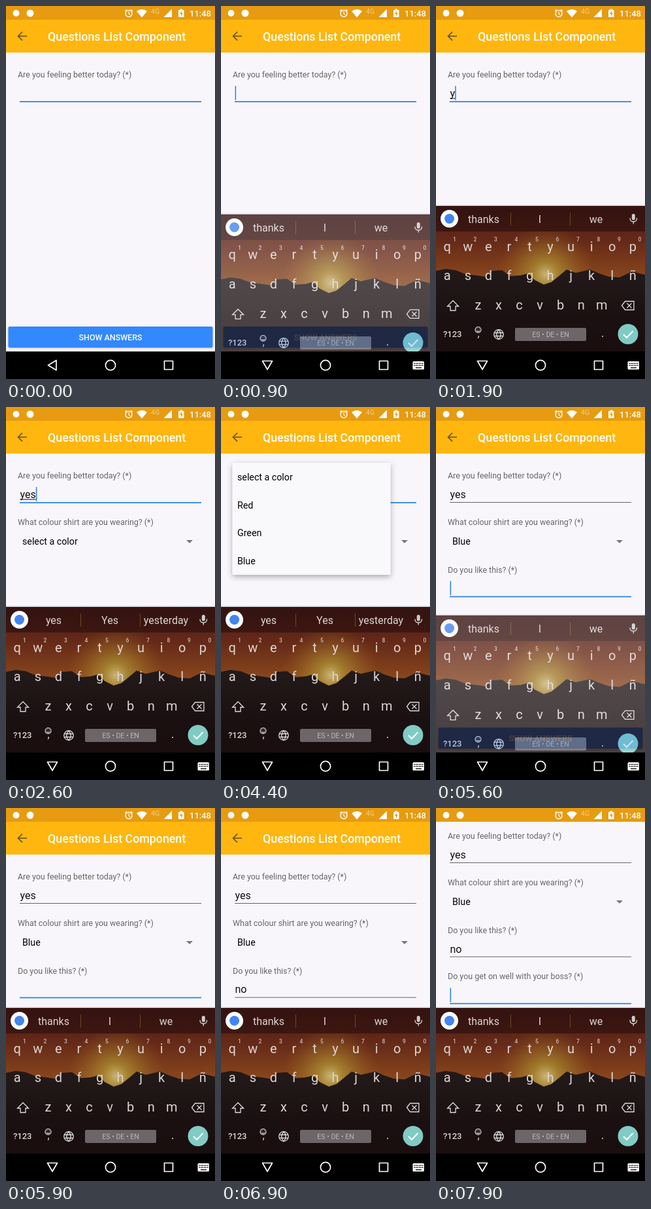
Write an HTML page that moves like this. It is 320x569 px and loops after 8000 ms.

```html
<!DOCTYPE html>
<html lang="en">
<head>
<meta charset="utf-8">
<title>Questions list</title>
<style>
  html, body { margin: 0; height: 100%; overflow: hidden; background: #f8f6fa; }
  svg { display: block; width: 100vw; height: 100vh; font-family: Roboto, sans-serif; }
  .mid { text-anchor: middle; }
  .bold { font-weight: 500; }
  .line { fill: none; stroke: #ddd; stroke-width: 1.3; }
</style>
</head>
<body>
<svg id="stage" viewBox="0 0 320 569">
  <defs>
    <linearGradient id="sky" x2="0" y2="1">
      <stop offset="0" stop-color="#4b1c17"/>
      <stop offset=".2" stop-color="#652918"/>
      <stop offset=".42" stop-color="#8a481d"/>
    </linearGradient>
    <radialGradient id="glow" gradientUnits="userSpaceOnUse" cx="168" cy="409" r="75">
      <stop offset="0" stop-color="#d5c98a" stop-opacity=".85"/>
      <stop offset=".25" stop-color="#b39a35" stop-opacity=".7"/>
      <stop offset="1" stop-color="#a0621c" stop-opacity="0"/>
    </radialGradient>
    <linearGradient id="rock" x2="0" y2="1">
      <stop offset="0" stop-color="#231a1a"/>
      <stop offset=".45" stop-color="#1b1011"/>
      <stop offset="1" stop-color="#180b0d"/>
    </linearGradient>
    <filter id="shadow" x="-10%" y="-10%" width="120%" height="125%">
      <feDropShadow dx="0" dy="3" stdDeviation="4" flood-opacity=".32"/>
    </filter>
    <filter id="soft" x="-5%" y="-20%" width="110%" height="150%">
      <feDropShadow dx="0" dy="1" stdDeviation="1" flood-opacity=".3"/>
    </filter>
    <clipPath id="aboveNav"><rect width="320" height="527"/></clipPath>
  </defs>
  <rect width="320" height="569" fill="#f8f6fa"/>
  <g id="page"></g>
  <g id="button"></g>
  <g id="status"></g>
  <g id="menu"></g>
  <g clip-path="url(#aboveNav)"><g id="keyboard"></g></g>
  <g id="nav"></g>
</svg>
<script>
const $ = id => document.getElementById(id);
const text = (x, y, s, size, fill, extra = '') =>
  `<text x="${x}" y="${y}" font-size="${size}" fill="${fill}" ${extra}>${s}</text>`;
const path = (d, extra = 'class="line"') => `<path d="${d}" ${extra}/>`;
const rect = (x, y, w, h, fill, extra = '') =>
  `<rect x="${x}" y="${y}" width="${w}" height="${h}" fill="${fill}" ${extra}/>`;
const circle = (x, y, r, extra) => `<circle cx="${x}" cy="${y}" r="${r}" ${extra}/>`;
const MID = 'class="mid"', BOLD = 'class="bold"', MIDBOLD = 'class="mid bold"';
const BLUE = '#3086e6';

// Form
const label = (y, s) => text(18, y, s, 12.44, '#666');
const field = (n, y) => `<g id="field${n}">
  ${text(21.5, y - 6, '', 16, '#111', `id="value${n}"`)}
  ${rect(21.5, y - 4.5, 0, 1, '#111', `id="compose${n}"`)}
  ${rect(21, y, 278, 1, '#666', `id="under${n}"`)}
  ${rect(21.5, y - 23, 1.6, 21.5, BLUE, `id="caret${n}"`)}</g>`;

$('page').innerHTML =
  rect(0, 21, 320, 50, '#ffb60f') +
  path('M32 46H19M25 39.5L18.5 46L25 52.5', 'fill="none" stroke="#65501f" stroke-width="1.7"') +
  text(64, 53.3, 'Questions List Component', 17.78, '#fff', BOLD) +
  label(109, 'Are you feeling better today? (*)') + field(1, 145) +
  `<g id="q2">${label(179.5, 'What colour shirt are you wearing? (*)')}
    ${text(25, 210, '', 14.22, '#000', 'id="colour"')}
    ${path('M276 203h10l-5 4.8z', 'fill="#757575"')}</g>
  <g id="q3">${label(252.5, 'Do you like this? (*)')}${field(3, 288.5)}</g>
  <g id="q4">${label(323.3, 'Do you get on well with your boss? (*)')}${field(4, 359.5)}</g>`;

$('button').innerHTML =
  rect(3.5, 489, 313, 32, '#3388ff', 'rx="2" filter="url(#soft)"') +
  text(160, 510, 'SHOW ANSWERS', 12.44, '#fff', MIDBOLD);

$('status').innerHTML =
  rect(0, 0, 320, 21, '#e69b10') +
  circle(15.5, 11, 5, 'fill="#fff"') + circle(37, 11, 5.5, 'fill="#fff"') +
  circle(188, 11.5, 5, 'fill="none" stroke="#fff" stroke-width="1.4"') +
  path('M188 8.5v3.5l2.3 1.4M182 7.7l3-2.5M194 7.7l-3-2.5', 'fill="none" stroke="#fff" stroke-width="1.2"') +
  path('M200 8Q208 2 216 8L208 17.5z', 'fill="#fff"') +
  text(222, 11.5, '4G', 10.5, '#f3cc85') +
  path('M254 4.5V17H241.5z', 'fill="#fff"') +
  path('M264 6h2.5V4.5h3.5V6h2.5v11H264z', 'fill="#fff"') +
  path('M269 7.5l-3 4.5h2v3.5l3-4.8h-2z', 'fill="#e69b10"') +
  text(281, 16, '11:48', 13, '#fff', BOLD);

$('menu').innerHTML =
  rect(17.5, 85, 242, 171, '#f9f8fb', 'rx="1.5" filter="url(#shadow)"') +
  ['select a color', 'Red', 'Green', 'Blue']
    .map((s, i) => text(25, 112 + 42.7 * i, s, 14.22, '#000')).join('');

// Keyboard
const INK = '#dcd6d4';
const keyRow = (keys, x, y) => [...keys]
  .map((c, i) => text(x + 31.55 * i, y, c, 20, INK, MID)).join('');

$('keyboard').innerHTML =
  rect(0, 303.5, 320, 1.5, '#000', 'opacity=".14"') +
  rect(0, 305, 320, 264, 'url(#sky)') +
  rect(80, 344, 180, 90, 'url(#glow)') +
  path(`M0 404L15 401 30 403 45 409 62 411 75 413 86 404 101 403 114 412 129 411 141 408
    151 418 165 425 177 421 188 412 200 402 214 407 236 402 250 408 265 413 281 414 300 405 320 410V569H0z`,
    'fill="url(#rock)"') +
  rect(0, 305, 320, 39, '#210b0c', 'opacity=".55"') +
  circle(20.5, 324.5, 13.5, 'fill="#fff"') + circle(20.5, 324.5, 7.5, 'fill="#4285f4"') +
  [73, 159, 245].map((x, i) => text(x, 331, '', 16, INK, `${MID} id="hint${i}"`)).join('') +
  path('M114.5 315v20M205.5 315v20', 'stroke="#684a21"') +
  rect(299.8, 317, 5, 9.5, '#ccc', 'rx="2.5"') +
  path('M297 323.5q0 5.5 5.3 5.5t5.3-5.5M302.3 329v3.5') +
  keyRow('qwertyuiop', 17.3, 373.5) + keyRow('asdfghjklñ', 17.3, 418) + keyRow('zxcvbnm', 64.5, 463) +
  [...'1234567890'].map((c, i) => text(28.3 + 31.5 * i, 359, c, 8.5, '#cbbbb5', MIDBOLD)).join('') +
  path('M26 449.5L17.5 458h4.5v6.5h8V458h4.5z') +
  path('M284.5 457l5-6.5H303v13h-13.5zM292.5 453.5l7 7M299.5 453.5l-7 7') +
  text(11, 505, '?123', 13, INK, BOLD) +
  circle(64.5, 494, 4.4, 'class="line" stroke-width="1"') +
  path('M62 495.3q2.5 2.6 5 0M62.8 492.2v1M66.2 492.2v1') +
  text(65, 505, ',', 16, INK, MID) +
  circle(96, 501, 7.3, 'class="line"') +
  path('M96 493.7q-6.5 7.3 0 14.6q6.5-7.3 0-14.6M89.5 498.5h13M89.5 503.5h13') +
  rect(121, 491, 109, 20, '#6d6668', 'rx="2"') +
  text(175.5, 505, 'ES • DE • EN', 10.6, '#bdb6b7', MID) +
  text(255, 505, '.', 18, INK, MID) +
  circle(294, 500.5, 15.5, 'fill="#80cbc4"') +
  path('M287 501l5 5 9.5-10', 'fill="none" stroke="#fff" stroke-width="2"');

const WHITE = 'fill="none" stroke="#fff" stroke-width="1.7" stroke-linejoin="round"';
$('nav').innerHTML =
  rect(0, 527, 320, 42, '#000') +
  path('M64.5 548L77 540.5v15z', `${WHITE} id="back"`) +
  circle(160, 548, 7.6, WHITE) + path('M242.5 541.5h13v13h-13z', WHITE) +
  `<g id="switcher">${rect(293.5, 542, 17.5, 12.5, '#fff', 'rx="1.5"')}
    ${path('M295.5 545.2h14M295.5 548.2h14', 'stroke="#000" stroke-width="1.5" stroke-dasharray="1.5 1"')}
    ${path('M298 551.8h9', 'stroke="#000" stroke-width="1.3"')}</g>`;

// Timeline
const LOOP = 8000;
const ramp = (t, a, b) => Math.min(1, Math.max(0, (t - a) / (b - a)));
const easeOut = u => 1 - (1 - u) ** 2;
const smooth = u => u * u * (3 - 2 * u);
const show = (id, on) => $(id).setAttribute('visibility', on ? 'visible' : 'hidden');
const set = (id, attrs) => { for (const k in attrs) $(id).setAttribute(k, attrs[k]); };
const within = (t, spans) => spans.some(([a, b]) => t >= a && t < b);
const typed = (t, word, times) => word.slice(0, times.filter(at => t >= at).length);
const widths = { '': 0, y: 7.6, ye: 16, yes: 24.3, n: 8.8, no: 18 };
const caretOn = [[500, 1000], [1500, 3000], [4500, 5000], [5400, 5900], [6100, 7400], [7900, LOOP]];

function render(t) {
  const focus = t < 5400 ? 1 : t < 6900 ? 3 : 4;
  const values = { 1: typed(t, 'yes', [1900, 2200, 2500]), 3: typed(t, 'no', [6100, 6400]), 4: '' };
  const composing = { 1: t < 4500, 3: t < 6900, 4: false };
  for (const n of [1, 3, 4]) {
    const w = widths[values[n]], active = n === focus;
    $('value' + n).textContent = values[n];
    set('compose' + n, { width: composing[n] ? w : 0 });
    set('under' + n, { height: active ? 1.8 : 1, fill: active ? BLUE : '#666' });
    set('caret' + n, { x: 21.5 + w, opacity: active && within(t, caretOn) ? 1 : 0 });
  }
  show('q2', t >= 2500);
  show('q3', t >= 4500);
  show('q4', t >= 6400);
  $('colour').textContent = t < 4500 ? 'select a color' : 'Blue';

  const scroll = 62 * smooth(ramp(t, 6900, 7300));
  set('page', { transform: `translate(0 ${-scroll})` });

  const open = smooth(ramp(t, 3250, 3550));
  const grow = 0.8 + 0.2 * open;
  set('menu', {
    opacity: open * (1 - ramp(t, 4420, 4620)),
    transform: `translate(0 ${205 * (1 - grow)}) scale(1 ${grow})`
  });

  const up = t < 4600 ? easeOut(ramp(t, 750, 1100))
    : t < 5400 ? 1 - smooth(ramp(t, 4600, 4850))
    : easeOut(ramp(t, 5450, 5800));
  set('keyboard', { opacity: Math.min(1, up * 1.16), transform: `translate(0 ${40 * (1 - up)})` });
  set('back', { d: up > 0 ? 'M63.5 541.5h15L71 554.5z' : 'M64.5 548L77 540.5v15z' });
  show('switcher', up > 0);

  const hints = within(t, [[2200, 5400]]) ? ['yes', 'Yes', 'yesterday']
    : within(t, [[6400, 6900]]) ? ['no', 'No', 'not'] : ['thanks', 'I', 'we'];
  hints.forEach((s, i) => { $('hint' + i).textContent = s; });
}

const start = performance.now();
function tick() {
  render((performance.now() - start) % LOOP);
  requestAnimationFrame(tick);
}
tick();
</script>
</body>
</html>
```
